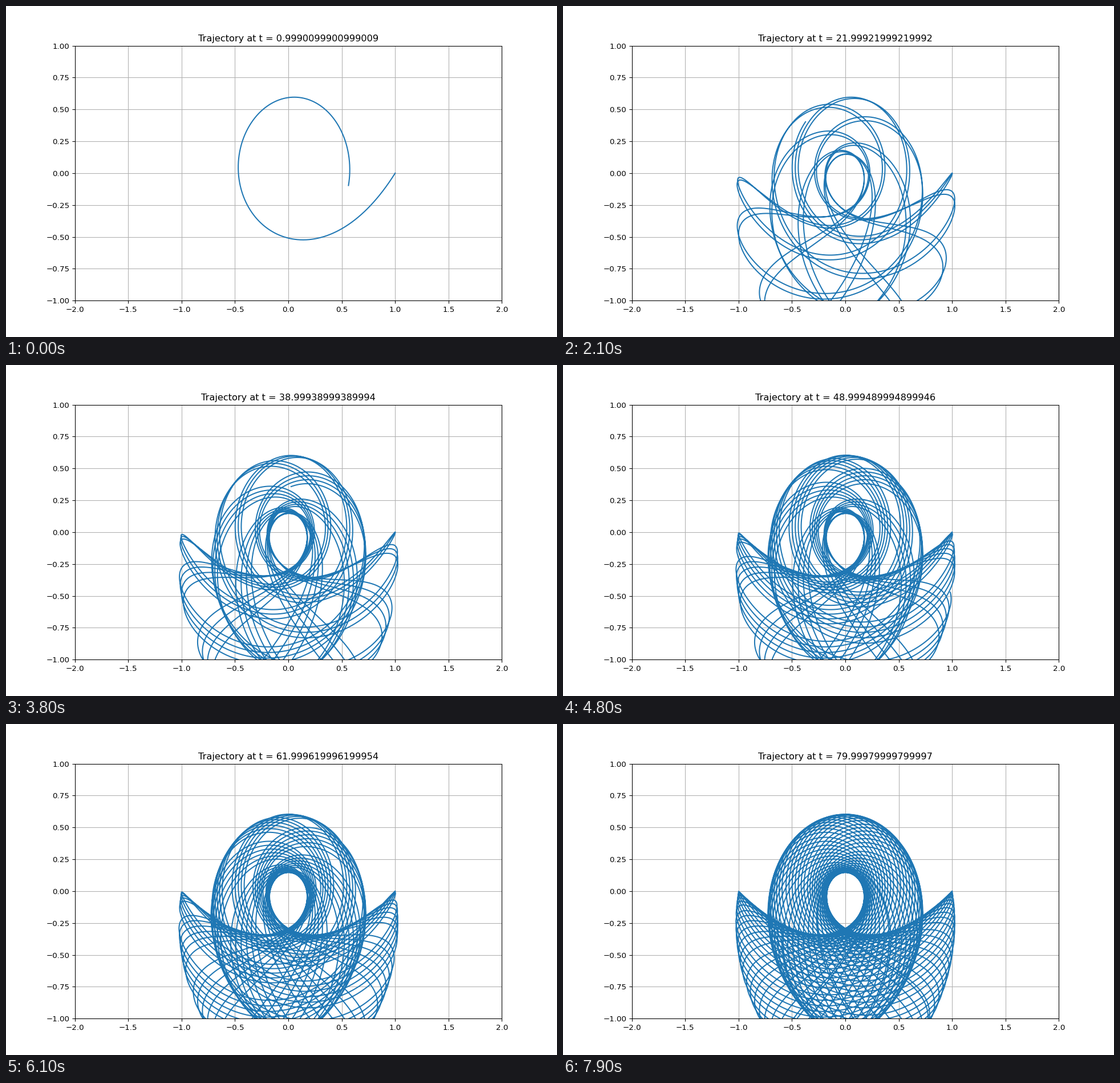
A matplotlib script for the animation above (8000 ms loop, 966 by 580 pixels).

```python
"""Swinging Atwood machine: path of the swinging mass, drawn as it grows."""
from math import cos, pi, sin

import matplotlib.pyplot as plt
import numpy as np
from matplotlib.animation import FuncAnimation

G = 9.81
MU = 3.0            # counterweight mass / swinging mass
FRAMES = 80
CHUNK = 1000        # samples added per frame
DPI = 96.6

t = np.linspace(0, 100, 100000)


def deriv(r, th, vr, w):
    """Time derivatives of radius, angle and their speeds."""
    ar = (r * w * w + G * (cos(th) - MU)) / (1 + MU)
    aw = -(2 * vr * w + G * sin(th)) / r
    return vr, w, ar, aw


def step(s, h):
    """One Runge-Kutta step of fourth order."""
    def ahead(k, f):
        return [a + f * b for a, b in zip(s, k)]

    k1 = deriv(*s)
    k2 = deriv(*ahead(k1, h / 2))
    k3 = deriv(*ahead(k2, h / 2))
    k4 = deriv(*ahead(k3, h))
    return [a + h / 6 * (p + 2 * q + 2 * u + v)
            for a, p, q, u, v in zip(s, k1, k2, k3, k4)]


def solve(n, h):
    """Cartesian path of n samples, released at rest from the horizontal."""
    path = np.empty((n, 2))
    s = [1.0, pi / 2, 0.0, 0.0]
    for i in range(n):
        path[i] = s[0] * sin(s[1]), -s[0] * cos(s[1])
        s = step(s, h)
    return path.T


x, y = solve(FRAMES * CHUNK, t[1])

# The small excess keeps the pixel size at 966 x 580 when truncated.
fig, ax = plt.subplots(figsize=(966.001 / DPI, 580.001 / DPI), dpi=DPI)
ax.set_xlim(-2, 2)
ax.set_ylim(-1, 1)
ax.grid(True)
line, = ax.plot([], [])


def update(frame):
    n = CHUNK * (frame + 1)
    line.set_data(x[:n], y[:n])
    ax.set_title(f"Trajectory at t = {t[n - 1]}")
    return line,


anim = FuncAnimation(fig, update, frames=FRAMES, interval=100,
                     repeat=True, repeat_delay=0, blit=False)
plt.show()
```
